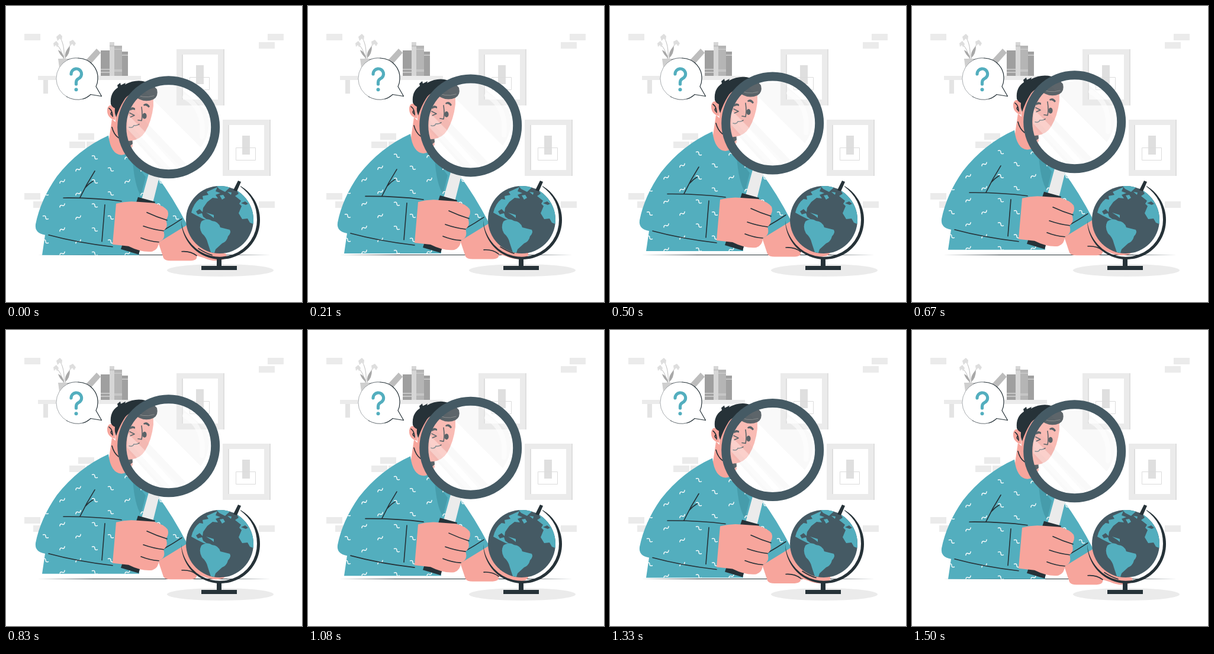
Write an HTML page that moves like this. It is 500 by 500 pixels and loops after 1540 ms.

```html
<!DOCTYPE html>
<html lang="en">
<head>
<meta charset="utf-8">
<title>Searching</title>
<style>
html, body { margin: 0; width: 100%; height: 100%; overflow: hidden; background: #fff; }
svg { display: block; width: 100vw; height: 100vh; }
.pale { fill: #ebebeb; }
.teal { fill: #53aebe; }
.slate { fill: #455a64; }
.dark { fill: #263238; }
.skin { fill: #f7a59c; }
.line { fill: none; stroke: #263238; stroke-width: 1.6; stroke-linecap: round; stroke-linejoin: round; }
.thin { stroke-width: .7; }
.wave { fill: none; stroke: #fff; stroke-width: 1.4; stroke-linecap: round; }
</style>
</head>
<body>
<svg viewBox="0 0 500 500">
  <defs>
    <clipPath id="ball"><circle cx="361" cy="361" r="57"/></clipPath>
    <clipPath id="lens"><circle cx="275" cy="204" r="73"/></clipPath>
    <clipPath id="cloth"><use href="#shirt"/></clipPath>
    <path id="brick" class="pale" d="M0 0h27v11H0z"/>
    <g id="frame">
      <path class="pale" d="M0 0h81v95H0z"/>
      <path fill="#dedede" d="M79 0h2v95h-2zM9 9h2v76H9z"/>
      <path fill="#fff" d="M11 9h59v76H11z"/>
      <path fill="#dfdfdf" d="M33 27h13v32H33z"/>
      <path fill="none" stroke="#dcdcdc" d="M22.500 47.500h33v21h-33z"/>
    </g>
  </defs>

  <use href="#brick" x="31" y="47"/>
  <use href="#brick" x="442" y="47"/>
  <use href="#brick" x="427" y="61"/>
  <use href="#brick" x="122" y="215"/>
  <use href="#brick" x="107" y="229"/>
  <use href="#brick" x="136" y="229"/>
  <use href="#brick" x="31" y="316"/>
  <use href="#brick" x="46" y="330"/>
  <use href="#brick" x="427" y="330"/>
  <use href="#frame" x="288" y="73"/>
  <use href="#frame" x="366" y="192"/>

  <g id="shelf">
    <path fill="#e4e4e4" d="M63 125h8v23h-8z"/>
    <path class="pale" d="M54 118h174v7H54z"/>
    <path fill="#bdbdbd" d="M153 72l7 7-24 27-7-8z"/>
    <path fill="#9f9f9f" d="M160 75h15v43h-15z"/>
    <path fill="#d6d6d6" d="M175 61h8v57h-8z"/>
    <path fill="#b5b5b5" d="M183 67h13v51h-13z"/>
    <path fill="#a0a0a0" d="M196 77h10v41h-10z"/>
    <path fill="#c6c6c6" d="M160 106h15v2h-15zM160 111h15v2h-15zM175 66h8v3h-8zM183 72h13v2h-13zM183 107h13v4h-13zM196 82h10v2h-10z"/>
    <path fill="#cfcfcf" d="M88 89h20l-4 29H92z"/>
    <path fill="none" stroke="#bdbdbd" d="M98 89C99 72 96 60 91 53M97 89C94 76 90 68 84 64M100 89C102 76 106 67 113 62"/>
    <path fill="#a8a8a8" d="M98 88Q90 82 88 74Q97 79 98 88M100 88Q98 77 108 68Q108 81 100 88"/>
    <path fill="#dedede" d="M85 52l6-5 4 4-1 8-3-4-4 4zM80 63l5-4 4 5-2 6-3-4-3 3zM107 60l6-3 5 6-3 5-3-4-4 4z"/>
  </g>

  <g id="bubble">
    <path fill="#fff" d="M143 150A35.500 35.500 0 1 1 153 136L161 152Z"/>
    <path class="line" style="stroke-width:.4" d="M104 154A35.500 35.500 0 0 1 104 91"/>
    <path class="line thin" d="M130 157Q116 161 102 153M104 91Q112 87 122 88"/>
    <path class="line" style="stroke-width:1.2" d="M122 88C144 89 156 107 155 123Q155 130 152 136L161.500 152.500L143 149.500Q137 155 130 157"/>
    <path fill="none" stroke="#53aebe" stroke-width="5.200" stroke-linecap="round" stroke-linejoin="round" d="M110 115A8.800 8.800 0 1 1 122 123Q118.500 125 118.500 129V132"/>
    <circle class="teal" cx="118.500" cy="141.300" r="3"/>
  </g>

  <ellipse class="pale" cx="362" cy="446.500" rx="90" ry="10.500"/>
  <path class="dark" d="M53 420.500L150 420H350L447 420.500L350 421H150Z"/>

  <g id="man">
    <!-- far hand -->
    <path class="skin" d="M257 398L304 369L330 398Q350 412 372 418Q374 424 366 428Q350 432 335 425L322 421Q324 429 312 429.500H280Q269 430 266 425Z"/>
    <path class="line" d="M297 414Q312 413 322 421M325 409Q337 417 348 420"/>

    <!-- head -->
    <path class="skin" d="M179 190L172 238Q182 252 195 252Q208 249 214 236L212 220Z"/>
    <path class="dark" d="M205 227Q211 229 213 221L214 232L209 236Z"/>
    <path class="skin" d="M190 145Q183 180 185 196Q191 224 211 227Q227 225 235 212Q246 194 249 168Q250 148 242 138Z"/>
    <path class="skin" d="M184 169Q173 163 171 174Q170 188 184 192Z"/>
    <path class="line" d="M174 172Q180 176 180 186M178 179Q176 182 179 184M179 204Q182 216 190 222"/>
    <path class="dark" d="M184 172Q179 170 177 165Q175 146 189 137L188 133L193 129L194 133L202 129L201 132Q216 124 230 126Q246 128 255 140Q258 152 249 157Q237 162 226 157Q217 153 212 148Q203 151 199 159Q192 170 186 187Q183 180 184 172Z"/>
    <path class="line" style="stroke:#777;stroke-width:.8" d="M216 146Q230 157 250 151"/>
    <path class="dark" d="M209 174Q212 168 218 172L218 175Q213 173 210 176ZM232 166Q238 161 243 169L241 171Q237 166 233 168Z"/>
    <ellipse class="dark" cx="234" cy="185" rx="3.600" ry="5"/>
    <path class="line" d="M209 180L217 184L210 187M229 170Q231 184 229 193L223 192M208 204Q214 206 216 201Q221 202 225 199"/>

    <!-- shirt -->
    <path id="shirt" class="teal" d="M173 218Q177 250 195 251Q204 251 210 240Q211 255 222 266Q238 283 256 288Q281 321 306 369L257 399L225 412V420H61L66 386Q48 383 50 368Q58 327 86 287Q122 241 173 218Z"/>
    <path fill="#469cab" d="M214 260L236 288L228 320Q217 303 214 260Z"/>
    <g id="waves" clip-path="url(#cloth)"></g>
    <path class="line" d="M97 323.500Q150 323 195 329M125 323Q136 300 150 278M134 306Q140 299 147 295M72 386Q120 399 180 406M167 335L162 397M266 378Q282 369 297 359"/>

    <!-- magnifier -->
    <path class="pale" d="M242 279L260 284L248 332L229 326Z"/>
    <path class="dark" d="M223 322L252 330L224 419L194 410Z"/>
    <g clip-path="url(#lens)">
      <circle cx="275" cy="204" r="73" fill="#fff" opacity=".24"/>
      <g fill="#8a8a8a" opacity=".055">
        <path d="M231 140L329 238Q350 210 338 176L290 134Z"/>
        <path d="M205 180L288 272L304 266L203 160ZM208 215L262 275L280 276L203 193Z"/>
      </g>
      <path fill="#fff" opacity=".3" d="M205 207L270 276H300L205 182Z"/>
      <path fill="none" stroke="#fff" stroke-width="8" stroke-linecap="round" opacity=".6" d="M302 153Q336 172 331 220"/>
    </g>
    <circle cx="274.700" cy="204" r="79" fill="none" stroke="#455a64" stroke-width="15"/>

    <!-- near hand -->
    <path class="skin" d="M186 333Q204 328 222 330L250 332Q267 337 273 345Q276 353 270 361Q275 372 266 379Q271 393 258 398Q258 410 247 414Q229 416 207 405L180 402Z"/>
    <path class="line" d="M238 348Q255 356 272 361M232 371Q249 377 266 379M228 391Q243 397 258 398"/>
  </g>

  <g id="globe">
    <circle class="slate" cx="361" cy="361" r="57"/>
    <g class="teal" clip-path="url(#ball)">
      <path d="M313 349Q317 333 327 326L333 327L332 321L342 319L339 314L357 306L354 313L362 316L354 319L358 325L349 324L340 331L333 341L332 348L327 343L321 347L324 352L331 350L333 356L340 361L334 360L322 354Z"/>
      <path d="M355 303H382L370 314L360 309ZM338 349L351 353V358L346 354ZM361 320L367 319L370 324L365 327ZM374 314L381 315L380 319Z"/>
      <path d="M330 364Q340 357 348 363Q359 364 362 374L378 378Q381 383 375 389Q373 398 365 401L354 411L352 417L346 416L341 401Q339 391 331 384Q325 374 330 364Z"/>
      <path d="M387 321L393 317L390 312L398 311L420 330V369L412 366L408 359L399 360L393 350L398 338L394 334L397 329Z"/>
    </g>
    <path class="slate" d="M397 333L404 330L409 334L405 336Z"/>
    <path class="dark" d="M384 311L392 295L397 297L390 313Z"/>
    <path class="dark" d="M396 304A66.500 66.500 0 1 1 296 362Q298 385 314 403A63 62 0 0 0 424 361Q424 326 396 305Z"/>
    <path class="dark" d="M356 426h8v13h26v7h-60v-7h26z"/>
  </g>
</svg>
<script>
const $ = id => document.getElementById(id);

// Shirt squiggles on a staggered lattice, cut to the cloth.
const ROW = 20.3, COL = 55;
for (let row = 0; row < 9; row++)
  for (let col = 0; col < 5; col++) {
    const x = (row % 2 ? 67 : 95) + col * COL, y = 255 + row * ROW;
    const turn = (row + col) % 2 ? 40 : -25;
    const wave = document.createElementNS('http://www.w3.org/2000/svg', 'path');
    wave.setAttribute('class', 'wave');
    wave.setAttribute('d', 'M-5 1Q-2.500-3 0 0T5-1');
    wave.setAttribute('transform', `translate(${x} ${y}) rotate(${turn})`);
    $('waves').append(wave);
  }

// The man floats up 10 px and back in 1.5 s at 24 steps a second.
const LOOP = 1540, STEP = 1000 / 24, HALF = 18, RISE = 10, REST = 0.7;
const man = $('man');
function draw(time) {
  const step = Math.floor((time % LOOP + 4.9) / STEP);
  const lift = RISE * Math.max(0, 1 - Math.abs(step - HALF) / HALF);
  man.setAttribute('transform', `translate(0 ${(REST - lift).toFixed(3)})`);
}
let start;
function tick(now) {
  start ??= now;
  draw(now - start);
  requestAnimationFrame(tick);
}
draw(0);
requestAnimationFrame(tick);
</script>
</body>
</html>
```
